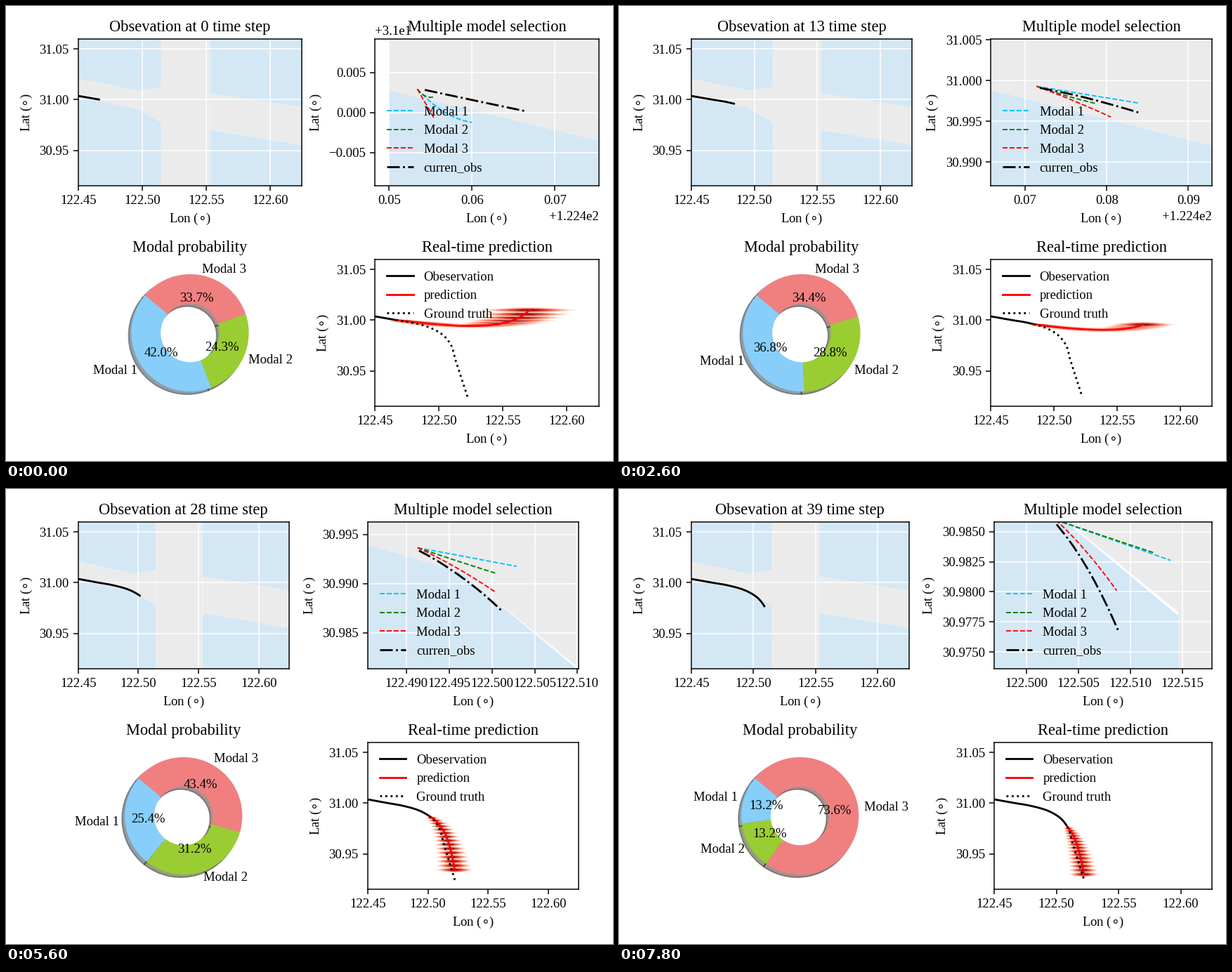
Write a matplotlib script that moves like this. It is 864 by 648 pixels and loops after 8 s.

```python
import numpy as np
import matplotlib.pyplot as plt
from matplotlib.animation import FuncAnimation
from matplotlib.collections import PolyCollection

plt.rcParams["font.family"] = "Liberation Serif"

STEPS = 40
W, H = 864, 648
LON, LAT = 122.45, 31.0
WATER, LAND = "#ebebeb", "#d4e7f5"
MODES = [("Modal 1", "deepskyblue"), ("Modal 2", "green"), ("Modal 3", "red")]

# All offsets from LON, LAT are in thousandths of a degree.
KNOTS = np.array([-13, 0, 9, 22, 30, 39, 54, 88])
TRACK_X = np.array([-1.0, 16.3, 28.6, 44.9, 52.9, 58.8, 63.1, 72.4])
TRACK_Y = np.array([4.0, 0.2, -2.4, -8.4, -14.4, -23.2, -40.0, -76.0])

# probabilities of the first and third mode; the second takes the rest
SHARE_STEPS = [0, 8, 13, 22, 28, 35, 39]
SHARE_1 = [42.0, 48.3, 36.8, 26.83, 25.4, 15.43, 13.2]
SHARE_3 = [33.7, 28.6, 34.4, 41.23, 43.4, 64.33, 73.6]

RINGS = (1, 0.84, 0.68, 0.5, 0.32)
BLOBS = 15


def degrees(x, y):
    return LON + np.asarray(x) / 1000, LAT + np.asarray(y) / 1000


def smooth(s, values):
    """Cubic curve through the knots."""
    i = np.clip(np.searchsorted(KNOTS, s, "right") - 1, 0, len(KNOTS) - 2)
    gap = KNOTS[i + 1] - KNOTS[i]
    t = (s - KNOTS[i]) / gap
    slope = np.gradient(values, KNOTS) 
    ease = t * t * (3 - 2 * t)
    return (values[i] * (1 - ease) + values[i + 1] * ease
            + gap * t * (1 - t) * (slope[i] * (1 - t) - slope[i + 1] * t))


def track(first, last):
    s = np.arange(first, last + 1)
    return smooth(s, TRACK_X), smooth(s, TRACK_Y)


def shares(step):
    a = np.interp(step, SHARE_STEPS, SHARE_1)
    c = np.interp(step, SHARE_STEPS, SHARE_3)
    return a, 100 - a - c, c


def draw_map(ax):
    top, low, end = 80, -110, 200
    west, east = 64.6, 103.1
    upper = [(0, 20.8), (46.8, 9), (west, 12.5)]
    lower = [(west, -22), (46.3, -8.8), (0, 2.8)]
    # the water stops slightly short of the south-western bank
    water = [
        upper + [(west, -21.7)] + lower[1:],
        [(west, top), (east, top), (east, low), (west, low)],
        [(east, 6.2), (end, -12.1), (end, -49.9), (east, -30)],
    ]
    land = [
        [(0, top), (west, top)] + upper[::-1],
        [(0, low), (west, low)] + lower,
        [(east, top), (end, top), (end, -12.1), (east, 6.2)],
        [(east, low), (end, low), (end, -49.9), (east, -30)],
    ]
    for shapes, color in ((water, WATER), (land, LAND)):
        for shape in shapes:
            ax.fill(*degrees(*zip(*shape)), color=color, lw=0, zorder=1)
    ax.grid(color="white")


def label(ax, title):
    ax.set_title(title, y=1.0)
    ax.set_xlabel(r"Lon ($\circ$)", labelpad=3.5)
    ax.set_ylabel(r"Lat ($\circ$)")


def mode_ends(step, reach):
    """End x, end y and sag of each mode, seen from the window start."""
    quick, slow = np.exp(-step / 3), np.exp(-step / 11)
    return [
        (12.7 - 0.045 * step - 7 * quick, -1.4 - 0.0055 * (step - 22) ** 2,
         -0.8 * quick),
        (9.6 - 8.6 * slow, -2.4 + 1.5 * slow, -0.35 * slow),
        (1.1 * slow + reach * (1 - slow), -3.5 - 2 * (step / 39) ** 3,
         0.3 * step / 39),
    ]


def path_ahead(step, start):
    """Control points of the predicted path and its spread."""
    x, y = start
    first, _, third = shares(step)
    if first >= third:
        end = 120.5, 10 - 0.085 * step ** 2
        bends = [(x + 0.38 * (end[0] - x), y - 6), (105, -12.5)]
        spread = 39 - 0.95 * step
    else:
        end = 72.3, -63.5 - 0.4 * (step - 22)
        bends = [(66, y - 10), (69, end[1] + 21)]
        spread = 18 - 0.3 * (step - 22)
    return np.array([start, *bends, end]), spread


def bezier(points, t):
    weights = np.array([(1 - t) ** 3, 3 * t * (1 - t) ** 2,
                        3 * t * t * (1 - t), t ** 3])
    return points.T @ weights


def lenses(points, spread):
    a = np.linspace(0, 2 * np.pi, 40)
    dx, dy = np.cos(a), np.sin(a) * np.abs(np.sin(a))
    verts = []
    for u in np.linspace(0.06, 1, BLOBS):
        x, y = bezier(points, u)
        w = spread * (0.15 + 0.85 * np.sqrt(u))
        h = 1.5 + 1.3 * u
        for r in RINGS:
            verts.append(np.column_stack(degrees(x + r * w * dx,
                                                 y + r * h * dy)))
    return verts


fig, ((ax_map, ax_zoom), (ax_pie, ax_pred)) = plt.subplots(
    2, 2, figsize=(W / 135, H / 135), dpi=135)

for ax in (ax_map, ax_zoom):
    draw_map(ax)
for ax in (ax_map, ax_pred):
    ax.set_xlim(122.45, 122.625)
    ax.set_ylim(30.915, 31.06)

label(ax_map, "")
seen, = ax_map.plot([], [], "k")

label(ax_zoom, "Multiple model selection")
modes = [ax_zoom.plot([], [], "--", color=c, lw=1, label=name)[0]
         for name, c in MODES]
window, = ax_zoom.plot([], [], "k-.", label="curren_obs")
ax_zoom.legend(loc="lower left", frameon=False)

label(ax_pred, "Real-time prediction")
reds = plt.cm.Reds(np.linspace(0.12, 1, len(RINGS)))
cloud = PolyCollection([], facecolors=np.tile(reds, (BLOBS, 1)),
                       edgecolors="none", alpha=0.6, zorder=1)
ax_pred.add_collection(cloud, autolim=False)
past, = ax_pred.plot([], [], "k", label="Obeservation")
ahead, = ax_pred.plot([], [], "r", label="prediction")
truth, = ax_pred.plot([], [], "k:", label="Ground truth")
ax_pred.legend(loc="upper left", frameon=False)


def draw_zoom(step):
    xs, ys = track(step - 9, step)
    window.set_data(*degrees(xs, ys))
    x0, y0 = -0.9 * np.exp(-step / 16), 0.1 + 0.007 * step
    t = np.linspace(0, 1, 30)
    for line, (x1, y1, sag) in zip(modes, mode_ends(step, xs[-1] - xs[0])):
        x = x0 + (x1 - x0) * t
        y = y0 + (y1 - y0) * t + 4 * sag * t * (1 - t)
        line.set_data(*degrees(xs[0] + x, ys[0] + y))
    ax_zoom.set_xlim(*degrees([xs[0] - 6, xs[-1] + 9], 0)[0])
    ax_zoom.set_ylim(*degrees(0, [ys[0] - 12, ys[-1] + 9])[1])


def draw_pie(step):
    ax_pie.clear()
    ax_pie.pie(shares(step), labels=[name for name, _ in MODES],
               colors=["lightskyblue", "yellowgreen", "lightcoral"],
               autopct="%1.1f%%", startangle=140,
               shadow={"ox": -0.025, "oy": -0.025},
               wedgeprops={"width": 0.5})
    ax_pie.set_title("Modal probability", y=1.0)


def draw_prediction(step):
    xs, ys = track(-13, step)
    past.set_data(*degrees(xs, ys))
    truth.set_data(*degrees(*track(step, KNOTS[-1])))
    points, spread = path_ahead(step, (xs[-1], ys[-1]))
    ahead.set_data(*degrees(*bezier(points, np.linspace(0, 1, 60))))
    cloud.set_verts(lenses(points, spread))


def arrange():
    """Tight columns with a fixed left margin and fixed rows."""
    fig.subplots_adjust(left=0.12, right=0.97, wspace=0.36)
    fig.tight_layout()
    pars = fig.subplotpars
    left = 102.8 / W
    gap = pars.wspace * (pars.right - pars.left) / (2 + pars.wspace)
    gap -= pars.left - left
    width = (pars.right - left - gap) / 2
    fig.subplots_adjust(left=left, wspace=gap / width, top=1 - 47 / H,
                        bottom=1 - 570 / H, hspace=105 / 209)


def update(step):
    ax_map.set_title(f"Obsevation at {step} time step", y=1.0)
    seen.set_data(*degrees(*track(-13, step)))
    draw_zoom(step)
    draw_pie(step)
    draw_prediction(step)
    arrange()
    return []


anim = FuncAnimation(fig, update, frames=STEPS, interval=200,
                     init_func=lambda: [], repeat=True, repeat_delay=0)
plt.show()
```
